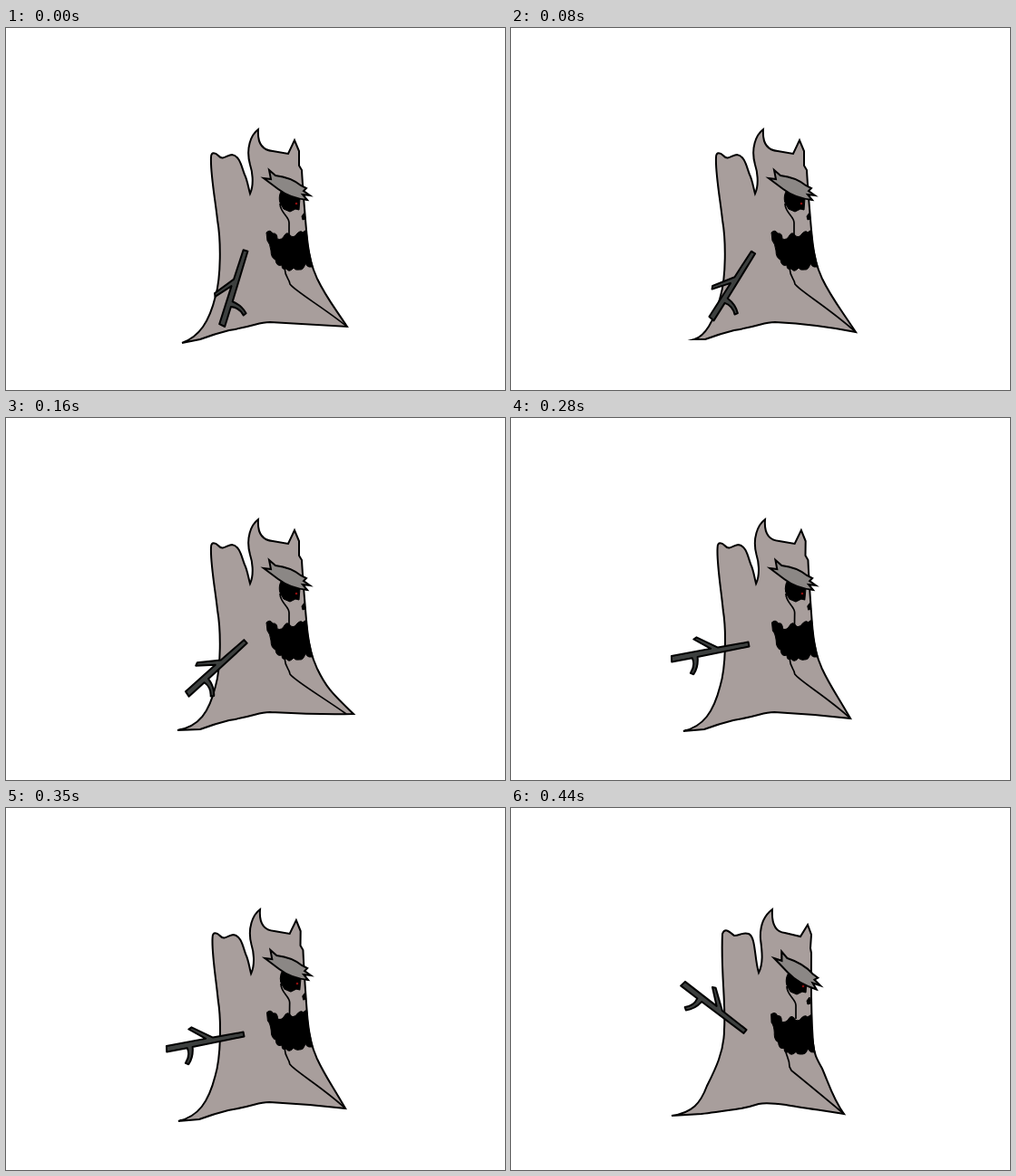
These frames come from a looping animation (550 by 400 pixels, 0.48 s). An HTML page:

```html
<!DOCTYPE html>
<html>
<head>
<meta charset="utf-8">
<title>Tree stump waving a branch</title>
<style>
html, body { margin: 0; width: 100%; height: 100%; overflow: hidden; background: #fff; }
svg { display: block; width: 100%; height: 100%; }
path { stroke: #000; stroke-width: 2; stroke-miterlimit: 8; }
.line { fill: none; stroke-width: 1.7; }
.ink { stroke-width: 1; stroke-linejoin: round; }
</style>
</head>
<body>
<svg viewBox="0 0 550 400">
  <g id="stump">
    <path id="body" fill="#a89e9c"/>
    <path id="crease" class="line"/>
    <g id="eye">
      <path class="line" d="M302,194C302,204 312,208 312,215L312,230"/>
      <path class="ink" d="M304,179C300,185 301,192 303,195L306,200L313,203L319,200L323,201L324,188L316,181Z"/>
      <circle cx="320" cy="194" r="1.3" fill="#8c1010"/>
    </g>
    <path id="nose" class="ink" d="M329,204L326,208L327,212L330,211Z"/>
    <path id="mouth" class="ink" d="M287,226Q291,222 294,227Q299,226 299,233Q304,235 307,229Q310,224 314,230Q318,232 321,227Q325,223 327,226L331,223L333,242L338,264L334,264Q331,263 330,260Q328,268 323,267Q319,268 317,265Q312,271 309,266Q304,268 304,262Q298,264 297,256Q292,254 292,246Q291,238 288,235Z"/>
    <path id="brow" fill="#8b8785" stroke-width="1.8" d="M284,166L292,167L290,157L297,163Q314,165 325,174L331,177L328,180L335,185L327,184L332,190Q313,188 300,178Z"/>
  </g>
  <path id="branch" fill="#3d403f" stroke-linejoin="round" d="M0,2.5L34,3L55,18.5L58.5,17L42,3.2L86,3.5L87,-3L64,-3Q62,-12 69,-19L66,-21Q59,-14 58,-3L0,-2.5Z"/>
</svg>
<script>
const el = id => document.getElementById(id);

const upright = (left, right) => `M${left}C213,341 224,325 231,296C237,275 237,235 233,212
  C231,192 225,160 226,143C226,136 231,138 234,141C239,147 244,140 249,140
  C258,141 260,155 263,162C266,168 267,176 269,183C274,172 271,157 269,151
  C264,133 270,118 278,112C277,126 281,135 294,136L311,139L318,124L323,136L323,152L326,157
  C327,175 329,200 331,223C334,258 339,268 343,277C352,296 358,303 ${right}
  C340,328 310,326 291,325C278,325 276,329 246,334Q230,338 214,344Z`;

const squashed = `M177,340C200,337 209,326 216,307C224,291 235,270 235,245
  C237,215 231,180 233,139C236,131 242,138 246,141C252,141 255,137 262,139
  C270,143 268,165 273,182C278,172 277,160 275,145C274,128 280,118 288,112
  C287,128 291,137 302,138L319,142L327,129L331,140L330,155L331,160
  C331,190 330,220 333,260C334,272 337,277 343,288C350,304 355,322 367,338
  C350,335 318,331 303,328C288,326 278,326 273,327C255,333 240,334 210,338Z`;

// Each pose: end time, branch pivot and angle, then the two feet when upright
const poses = [
  { end: 80, arm: [264, 246, 107.2], left: "194,348", right: "376,330" },
  { end: 160, arm: [267, 248, 122], left: "202,344", right: "380,336" },
  { end: 280, arm: [264, 247, 137.8], left: "189,345", right: "383,327", tip: "375,327" },
  { end: 400, arm: [262, 250, 169], left: "191,346", right: "375,332", lean: -0.0133 },
  { end: 440, arm: [258, 249, 203], squash: true },
  { end: 480, arm: [258, 247, 217.5], squash: true }
];

const move = (id, t) => el(id).setAttribute("transform", t);
const shape = (id, d) => el(id).setAttribute("d", d);
let shown;

function show(p) {
  const [x, y, angle] = p.arm, s = p.squash, k = p.lean || 0;
  move("branch", `translate(${x} ${y}) rotate(${angle})`);
  move("stump", `matrix(1 0 ${k} 1 ${-265 * k} 0)`);
  shape("body", s ? squashed : upright(p.left, p.right));
  shape("crease", s ? "M302,265C303,275 307,276 307,286L309,290Q330,307 367,338"
    : `M307,265C308,277 312,276 313,283C319,291 350,309 ${p.tip || p.right}`);
  move("eye", s ? "translate(2 3)" : "");
  move("nose", s ? "translate(0 5)" : "");
  move("mouth", s ? "matrix(1 .08 -.07 1 15.5 -21)" : "");
  move("brow", s ? "translate(290 166) rotate(12) scale(1.1 1) translate(-284 -166)" : "");
}

function frame() {
  const t = performance.now() % 480;
  const p = poses.find(p => t < p.end);
  if (p !== shown) show(shown = p);
  requestAnimationFrame(frame);
}
frame();
</script>
</body>
</html>
```
